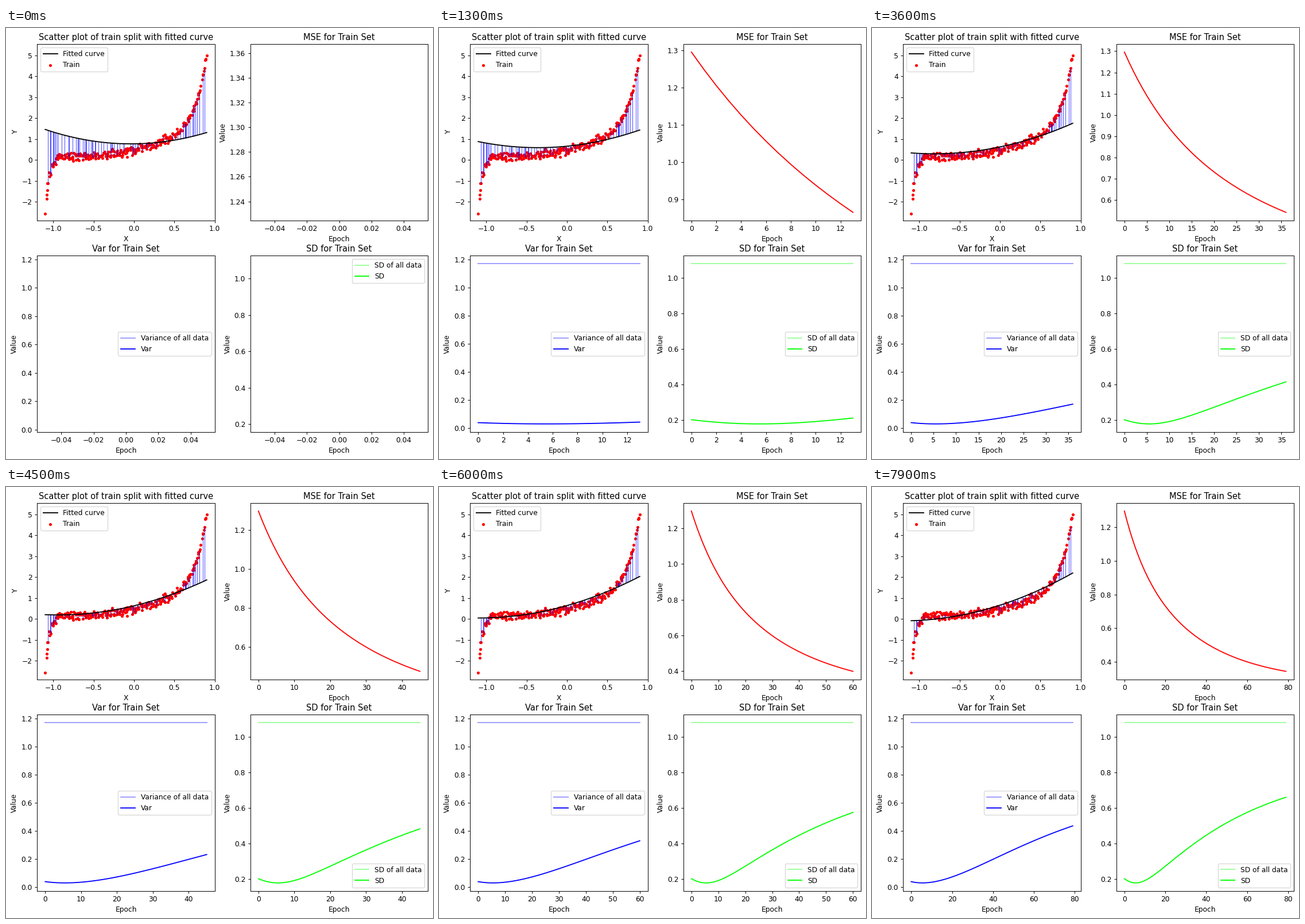
Animation of 744x752 px, one loop 8 s. Source, as a matplotlib script:

```python
import numpy as np
import matplotlib.pyplot as plt
from matplotlib.animation import FuncAnimation

W, H, DPI = 744, 752, 88
EPOCHS = 80
LEFT, TOP = 54.2, 28.0
AX_W, AX_H = 309.6, 307.6
GAP = 1.2  # panel pitch relative to panel size
X_MIN, X_MAX = -1.1, 0.9
POINTS = 255

plt.rcParams.update({"font.family": "DejaVu Sans", "font.size": 10})


def make_data():
    """Shuffled noisy samples: a flat valley with steep exponential ends."""
    rng = np.random.default_rng(11)
    x = np.linspace(X_MIN, X_MAX, POINTS) + rng.normal(0, 0.006, POINTS)
    x = rng.permutation(np.clip(x, X_MIN, X_MAX))
    valley = 0.48 + 0.87 * x + 0.62 * x**2
    drop = 2.7 * np.exp((X_MIN - x) / 0.055)
    rise = 3.35 * np.exp((x - X_MAX) / 0.13)
    return x, valley - drop + rise + rng.normal(0, 0.1, POINTS)


def model(x, n):
    """Quadratic fit whose coefficients relax exponentially."""
    a = 0.445 + 0.0009 * n + 0.169 * np.exp(-n / 16)
    b = 1.6 - 1.551 * np.exp(-0.0187 * n)
    c = 0.58 + 0.001 * n + 0.191 * np.exp(-n / 12)
    return a * x**2 + b * x + c


def add_panel(col, row, title, xlabel="Epoch", ylabel="Value"):
    left = LEFT + col * GAP * AX_W
    bottom = H - TOP - row * GAP * AX_H - AX_H
    ax = fig.add_axes([left / W, bottom / H, AX_W / W, AX_H / H])
    ax.set(title=title, xlabel=xlabel, ylabel=ylabel)
    return ax


def add_history(ax, values, color, label=None, alpha=1):
    line, = ax.plot([], [], color=color, label=label, alpha=alpha)
    history.append((line, values))


epochs = np.arange(EPOCHS)
mse = 0.27 + 0.78 * np.exp(-0.03 * epochs) + 0.246 * np.exp(-0.1 * epochs)
var = 0.0315 + 0.865 * (np.exp(-0.0195 * epochs) - np.exp(-0.0195 * 5.5))**2
var_all = np.full(EPOCHS, 1.1695)

fig = plt.figure(figsize=(W / DPI, H / DPI), dpi=DPI, facecolor="white")
ax_fit = add_panel(0, 0, "Scatter plot of train split with fitted curve", "X", "Y")
ax_mse = add_panel(1, 0, "MSE for Train Set")
ax_var = add_panel(0, 1, "Var for Train Set")
ax_sd = add_panel(1, 1, "SD for Train Set")

x, y = make_data()
xs, ys = x[::3], y[::3]
grid = np.linspace(X_MIN, X_MAX, 200)

residuals = ax_fit.vlines(xs, ys, model(xs, 0), colors="blue", lw=0.8, alpha=0.7)
curve, = ax_fit.plot(grid, model(grid, 0), color="black", label="Fitted curve")
ax_fit.scatter(x, y, s=10, color="red", label="Train")
ax_fit.set(xlim=(-1.2, 1.0), ylim=(-2.893, 5.55))
ax_fit.legend(loc="upper left")

history = []
add_history(ax_mse, mse, "red")
add_history(ax_var, var_all, "blue", "Variance of all data", 0.4)
add_history(ax_var, var, "blue", "Var")
add_history(ax_sd, np.sqrt(var_all), "lime", "SD of all data", 0.4)
add_history(ax_sd, np.sqrt(var), "lime", "SD")
ax_var.legend(loc="best")
ax_sd.legend(loc="best")


def update(n):
    fit = model(xs, n)
    curve.set_ydata(model(grid, n))
    residuals.set_segments(np.stack([np.c_[xs, ys], np.c_[xs, fit]], axis=1))
    for line, values in history:
        line.set_data(epochs[:n + 1], values[:n + 1])
    for ax in (ax_mse, ax_var, ax_sd):
        ax.relim()
        ax.autoscale_view()
    return []


anim = FuncAnimation(fig, update, frames=EPOCHS, interval=100,
                     init_func=lambda: update(0), repeat=True, repeat_delay=0)
plt.show()
```
